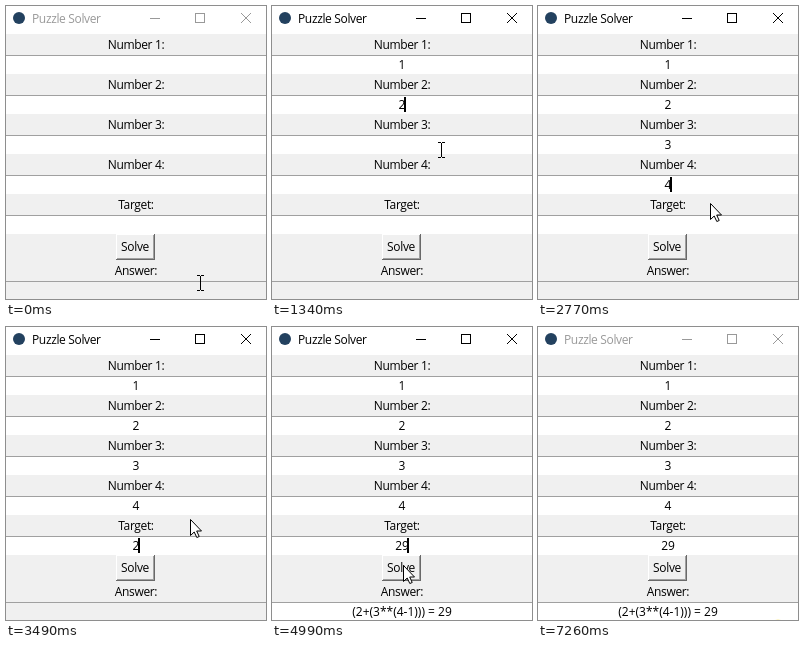
Recreate the animation shown at these times as an HTML page. Size 260 by 293 pixels, loop 7.34 s.

```html
<!DOCTYPE html>
<html lang="en">
<head>
<meta charset="utf-8">
<title>Puzzle Solver</title>
<style>
  html, body { margin: 0; width: 100%; height: 100%; overflow: hidden; background: #f0f0f0; }
  svg { display: block; width: 260px; height: 293px; }
  text { font: 12px "Open Sans", "Noto Sans", sans-serif; letter-spacing: -.35px; white-space: pre; }
  .mid { text-anchor: middle; }
  .value { letter-spacing: 0; }
  .idle { color: #999; }
  #bar text { fill: currentColor; }
  #controls { fill: none; stroke: currentColor; }
  .smooth { shape-rendering: auto; }
</style>
</head>
<body>
<svg viewBox="0 0 260 293" shape-rendering="crispEdges">
  <rect width="260" height="293" fill="#f0f0f0"/>
  <rect width="260" height="28" fill="#fff"/>
  <circle class="smooth" cx="13" cy="12" r="6" fill="#23415f"/>
  <g id="bar">
    <text x="26" y="17">Puzzle Solver</text>
    <g id="controls">
      <path d="M144 12.5h10M189.500 7.500h9v9h-9z"/>
      <path class="smooth" d="M235 7l10 10M245 7l-10 10"/>
    </g>
  </g>
  <g id="rows"></g>
  <g fill="none">
    <path id="light" d="M110 228.500H149M110.500 228V254"/>
    <path id="shade" d="M110 253.500H148.500V228"/>
    <path id="inner" d="M111 252.500H147.500V229"/>
  </g>
  <text id="solve" class="mid" x="129" y="245">Solve</text>
  <rect id="caret" width="2" height="15"/>
  <g id="pointer">
    <circle id="glow" class="smooth" r="8.500" fill="#f7e36e" fill-opacity=".8"/>
    <path id="arrow" class="smooth" fill="#fff" stroke="#000"
      d="M.5 .5V16.500L4.200 13L6.800 18.500L9.200 17.500L6.700 12H11.500z"/>
    <path id="beam" fill="none" stroke="#000"
      d="M-3 -7.500H0M1 -7.500H4M.5 -7V7M-3 7.500H0M1 7.500H4"/>
  </g>
</svg>
<script>
const LOOP = 7340, TICK = 79.35;       // pointer moves once per tick
const FIRST = 430, STEP = 640;         // focus of the first field, time per field
const KEY = 260;                       // time per keystroke
const HOLD = 280, ON = 550, BLINK = 860;
const PRESS = 4600, CLICK = 80, BLUR = 7260;
const CLICKS = [FIRST + 30, PRESS, BLUR];

const TYPED = ["1", "2", "3", "4", "29"];
const LABELS = ["Number 1:", "Number 2:", "Number 3:", "Number 4:", "Target:", "Answer:"];
const RESULT = "(2+(3**(4-1))) = 29";

// Pointer stops: time, x, y
const STOPS = [
  [0, 194, 277], [460, 152, 60], [1335, 169, 144], [2765, 172, 197], [3480, 184, 192],
  [3880, 184, 192], [4110, 148, 269], [4350, 129, 236], [4830, 129, 236], [5230, 134, 240],
  [5540, 200, 320], [LOOP, 243, 300]
];

const $ = id => document.getElementById(id);
const last = TYPED.length;
const entryTop = i => i < last ? 49 + 40 * i : 275;
const show = (el, on) => { el.style.display = on ? "" : "none"; };
const move = (el, x, y) => el.setAttribute("transform", `translate(${x} ${y})`);

function add(tag, attrs, content = "") {
  const el = document.createElementNS("http://www.w3.org/2000/svg", tag);
  for (const k in attrs) el.setAttribute(k, attrs[k]);
  el.textContent = content;
  return $("rows").appendChild(el);
}

const rows = LABELS.map((label, i) => {
  const y = entryTop(i);
  add("text", { class: "mid", x: 130, y: y - 6 }, label);
  const box = add("rect", { y, width: 260, height: 19, fill: "#fff" });
  add("rect", { y, width: 260, height: 1, fill: "#a0a0a0" });
  return { y, box, text: add("text", { class: "mid value", x: 130, y: y + 14 }) };
});

function valueAt(i, t) {
  if (i === last) return t < PRESS + CLICK ? "" : RESULT;
  return TYPED[i].slice(0, Math.max(0, Math.floor((t - FIRST - STEP * i) / KEY)));
}

function drawCaret(t) {
  const i = Math.min(last - 1, Math.floor((t - FIRST) / STEP));
  const age = Math.max(0, t - FIRST - STEP * i - HOLD);
  show($("caret"), i >= 0 && t < BLUR && age % BLINK < ON);
  if (i >= 0) move($("caret"), 129 + 3 * valueAt(i, t).length, entryTop(i) + 2);
}

function drawButton(down) {
  const edge = (id, up, pressed) => $(id).setAttribute("stroke", down ? pressed : up);
  edge("light", "#fff", "#696969");
  edge("shade", "#696969", "#fff");
  edge("inner", "#a0a0a0", "#e3e3e3");
  move($("solve"), +down, +down);
}

function pointerAt(t) {
  const i = STOPS.findIndex(s => s[0] > t);
  const [t0, ...from] = STOPS[i - 1], [t1, ...to] = STOPS[i];
  return from.map((v, n) => Math.round(v + (to[n] - v) * (t - t0) / (t1 - t0)));
}

function drawPointer(t) {
  const tick = Math.floor((t - 70) / TICK) * TICK + 70;
  const [x, y] = pointerAt(Math.max(0, tick));
  const overEntry = rows.some(r => y >= r.y && y < r.y + 19);
  show($("beam"), overEntry);
  show($("arrow"), !overEntry);
  show($("glow"), CLICKS.some(c => t >= c && t < c + CLICK));
  move($("pointer"), x, y);
}

function render(t) {
  rows.forEach(({ text }, i) => {
    const value = valueAt(i, t);
    if (text.textContent !== value) text.textContent = value;
  });
  // The answer field is disabled until there is a result
  rows[last].box.setAttribute("fill", valueAt(last, t) ? "#fff" : "#f0f0f0");
  $("bar").setAttribute("class", t < FIRST || t >= BLUR ? "idle" : "");
  drawCaret(t);
  drawButton(t >= PRESS && t < PRESS + CLICK);
  drawPointer(t);
}

const origin = performance.now();
function frame() {
  render((performance.now() - origin) % LOOP);
  requestAnimationFrame(frame);
}
frame();
</script>
</body>
</html>
```
